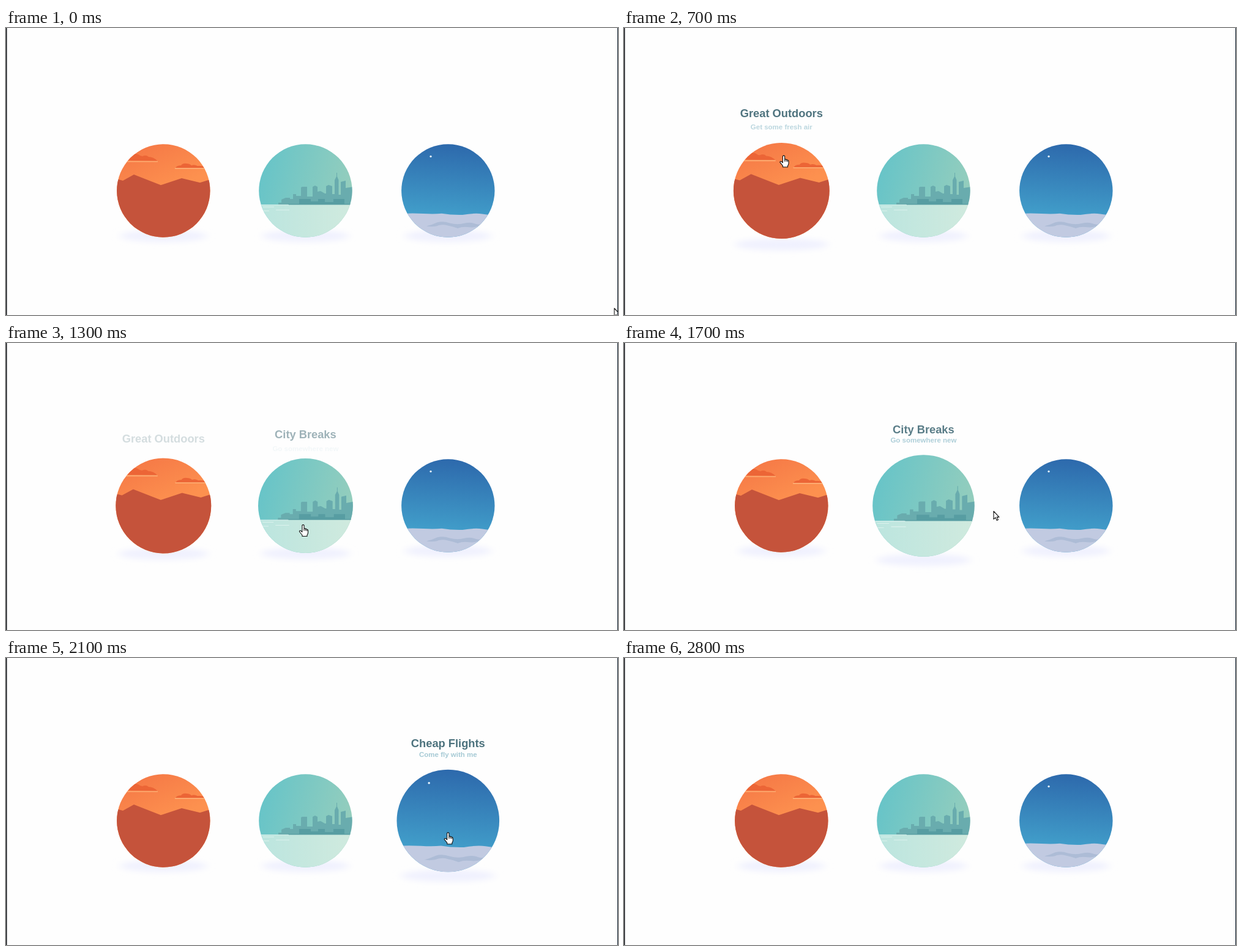
These frames come from a looping animation (1000 px wide and 470 px high, 3 s). An HTML page:

```html
<!DOCTYPE html>
<html lang="en">
<head>
<meta charset="utf-8">
<title>Travel cards</title>
<style>
html, body { margin: 0; width: 100%; height: 100%; overflow: hidden; background: #fefefe }
svg { display: block; width: 1000px; height: 470px }
text { font-family: "Liberation Sans", Arial, sans-serif; font-weight: bold; text-anchor: middle }
.title { font-size: 18.3px; fill: #4c727d }
.sub { font-size: 11.5px; fill: #a6cad5 }
.shadow { fill: #f0f1fe; filter: url(#soft) }
.cursor { fill: #fff; stroke: #111; stroke-width: 1.1; stroke-linejoin: round }
</style>
</head>
<body>
<svg viewBox="0 0 1000 470">
  <defs>
    <filter id="soft" x="-20%" y="-150%" width="140%" height="400%"><feGaussianBlur stdDeviation="7 5"/></filter>
    <clipPath id="disc"><circle r="76.2"/></clipPath>
    <linearGradient id="dusk" x1=".4" y1="0" x2=".6" y2=".46">
      <stop stop-color="#f67b47"/><stop offset="1" stop-color="#fd914f"/>
    </linearGradient>
    <linearGradient id="haze" x1="0" y1=".4" x2="1" y2=".65">
      <stop stop-color="#67c4c8"/><stop offset="1" stop-color="#97cebc"/>
    </linearGradient>
    <linearGradient id="sea">
      <stop stop-color="#bbe5df"/><stop offset="1" stop-color="#d0eade"/>
    </linearGradient>
    <linearGradient id="night" x1=".53" y1="0" x2=".47" y2=".8">
      <stop stop-color="#2d69ac"/><stop offset="1" stop-color="#42a0cb"/>
    </linearGradient>

    <g id="art0">
      <path fill="url(#dusk)" d="M180 190H335V344H180Z"/>
      <path fill="#ec6536" d="M196 217L203 210Q209 204 216 207Q220 210 223 210Q229 207 233 211Q241 211 248 218Z"/>
      <path fill="#ec6536" d="M277 229Q279 225 286 225Q289 221 295 222Q300 222 303 225Q308 223 313 226Q322 225 330 229Z"/>
      <path fill="none" stroke="#fdab70" stroke-width="1.8" d="M194 218.6H248M276 230H334"/>
      <path fill="#c5533b" d="M180 247L191 250L209 240L253 257.3L287 246L317 253.3L335 247.5V345H180Z"/>
    </g>

    <g id="art1">
      <path fill="url(#haze)" d="M412 190H567V344H412Z"/>
      <path fill="#69acae" d="M445 290V286H450V281L457 278H464V280H469V272H474V275H482V261L484 260H492V276H501V260L505 258L509 260V268L514 267L521 271H523V259L527 257L533 259V272H537V249L540 243V237H541V243L543.5 249V273H547V252L555 250V262L567 260V290Z"/>
      <path fill="#579da2" d="M461 290V288H479V280H498V284H510V280H521V285H535V280H553V288H567V290Z"/>
      <path fill="url(#sea)" d="M412 289.5H567V344H412Z"/>
      <path stroke="#e3f6f2" stroke-opacity=".8" d="M413 289.7H462M420 293H438M441 298H463M418 299.5H430"/>
    </g>

    <g id="art2">
      <path fill="url(#night)" d="M645 190H800V344H645Z"/>
      <circle cx="694" cy="210.3" r="1.6" fill="#e9f6ff"/>
      <path fill="#c1cae1" d="M645 304Q665 303 682 304T712 303.8Q728 306.5 746 306Q766 302.5 778 304.5T800 307V345H645Z"/>
      <path fill="#adbcd6" d="M687 324.5Q697 322 704 318.5Q714 315.5 725 319.5Q738 323 750 319.5Q760 317.5 768 321Q773 322.5 778 321Q769 328 754 326Q746 325 738 328Q731 325 722 323.5Q712 320.5 703 324.5Q695 326 687 324.5Z"/>
    </g>
  </defs>
  <g id="cards"></g>
  <path id="arrow" class="cursor" d="M0 0V13L3 10.3L5.2 15L7.4 14L5.3 9.6H9Z"/>
  <path id="hand" class="cursor" d="M-1.6 1.2Q0-.9 1.6 1.2V6.5Q3.2 5.6 4 7Q5.7 6.3 6.2 8Q8 7.6 8 9.5V13Q8 15 6.5 17V19H-1.5V17L-6 11.5Q-6.3 9.4-4 9.8L-1.6 12ZM1.6 6.5V10M4 7V10M6.2 8V10.5"/>
  <path fill="#15171b" d="M0 0H1.5V470H0Z"/>
  <path fill="#0d1b2a" d="M999 0H1000V470H999Z"/>
</svg>
<script>
const LOOP = 3000, STEP = 100, MID = 266.5;
const $ = id => document.getElementById(id);

// Each visit is the time the pointer enters and leaves the card
const cards = [
  { x: 257.3, title: 'Great Outdoors', sub: 'Get some fresh air', visits: [[590, 1200]] },
  { x: 489.4, title: 'City Breaks', sub: 'Go somewhere new', visits: [[1240, 1690]] },
  { x: 722.3, title: 'Cheap Flights', sub: 'Come fly with me', visits: [[180, 300], [1720, 2330]] }
];

// Pointer stops: time, x, y
const stops = [
  [0, 994, 459], [400, 409.5, 106.5], [700, 261, 208.7], [1200, 270, 235], [1300, 485.5, 297.5],
  [1700, 604, 275.5], [1850, 722.3, 285.7], [2200, 722.3, 285.7], [2400, 608.5, 434], [2500, 515, 560]
];

$('cards').innerHTML = cards.map((c, i) => `<g>
  <ellipse class="shadow" cx="${c.x}" ry="10"/>
  <g><g clip-path="url(#disc)"><use href="#art${i}" x="${-c.x}" y="${-MID}"/></g></g>
  <text class="title" x="${c.x}">${c.title}</text>
  <text class="sub" x="${c.x}">${c.sub}</text></g>`).join('');
cards.forEach((c, i) => c.parts = $('cards').children[i].children);

const clamp = v => Math.min(1, Math.max(0, v));
const mix = (a, b, f) => a + (b - a) * f;

function set(el, attrs) {
  for (const k in attrs) el.setAttribute(k, attrs[k]);
}

// How far a part has opened: rises after entering, falls after leaving
function hover(visits, t, delay, rise, fall) {
  return Math.max(...visits.map(([enter, leave]) =>
    clamp((t - enter - delay) / rise) * clamp(1 - (t - leave) / fall)));
}

function pointer(t) {
  const i = stops.findIndex(s => s[0] > t);
  if (i < 0) return stops[stops.length - 1].slice(1);
  const [t0, x0, y0] = stops[i - 1], [t1, x1, y1] = stops[i], f = (t - t0) / (t1 - t0);
  return [mix(x0, x1, f), mix(y0, y1, f)];
}

function draw(t) {
  for (const { x, visits, parts: [shadow, disc, title, sub] } of cards) {
    const grow = hover(visits, t, 0, 380, 130);
    const drop = hover(visits, t, 40, 80, 140);
    const head = hover(visits, t, 0, 112, 130);
    const line = hover(visits, t, 50, 80, 100);
    set(shadow, { cy: 340.5 + 16 * drop, rx: 71 + 6 * drop });
    set(disc, { transform: `translate(${x} ${MID}) scale(${1 + .1 * grow})` });
    set(title, { y: mix(168, 146, head), opacity: head });
    set(sub, { y: mix(179, 161.5, line), opacity: line });
  }
  const [x, y] = pointer(t);
  const over = cards.some(c => Math.hypot(x - c.x, y - MID) < 80);
  for (const [id, on] of [['arrow', !over], ['hand', over]])
    set($(id), { transform: `translate(${x} ${y})`, visibility: on ? 'visible' : 'hidden' });
}

const start = performance.now();
function tick() {
  const t = (performance.now() - start) % LOOP;
  draw(Math.floor(t / STEP) * STEP);
  requestAnimationFrame(tick);
}
tick();
</script>
</body>
</html>
```
